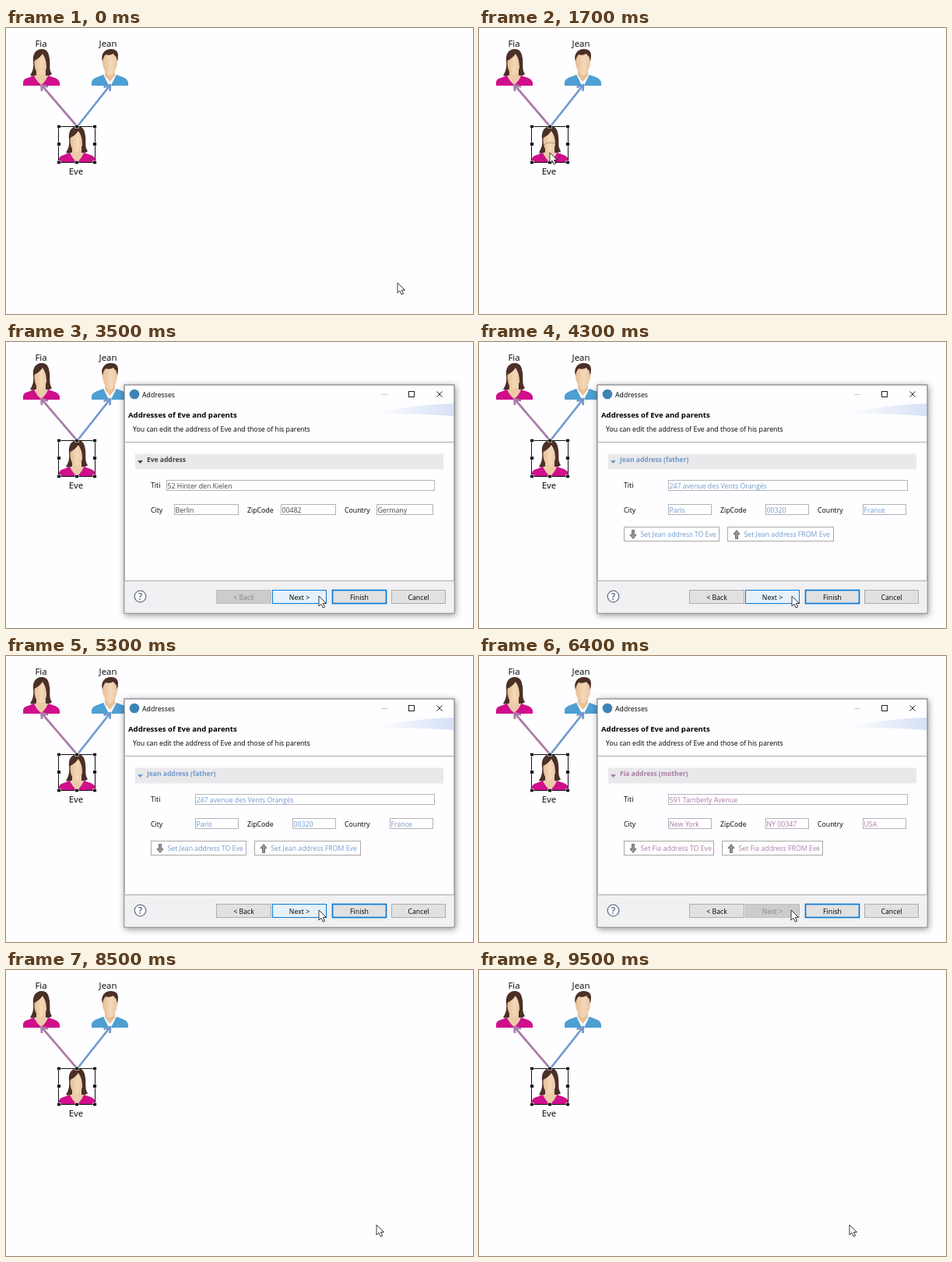
An HTML page for the animation above (9.6 s loop, 600x367 px).

```html
<!DOCTYPE html>
<html lang="en">
<head>
<meta charset="utf-8">
<title>Address wizard</title>
<style>
  html, body { margin: 0; width: 100%; height: 100%; overflow: hidden; background: #fefdff; }
  svg { display: block; width: 100%; height: 100%; }
  text { font: 8.75px "Open Sans", "Noto Sans", sans-serif; fill: #000; white-space: pre; }
  .name { font-size: 11.4px; text-anchor: middle; }
  .mid { text-anchor: middle; }
  .title { font-size: 9.6px; font-weight: 700; }
  .section { font-size: 8.5px; font-weight: 700; }
  .line { fill: none; stroke-width: 2.7; stroke-linejoin: round; }
</style>
</head>
<body>
<svg id="stage" viewBox="0 0 600 367">
  <defs>
    <linearGradient id="skin">
      <stop offset="0" stop-color="#e8bd94"/><stop offset=".55" stop-color="#f3d8ba"/><stop offset="1" stop-color="#ebc6a0"/>
    </linearGradient>
    <linearGradient id="banner">
      <stop offset="0" stop-color="#fff"/><stop offset="1" stop-color="#d6e1f6"/>
    </linearGradient>
    <filter id="shadow" x="-5%" y="-6%" width="110%" height="114%">
      <feDropShadow dx="1" dy="2" stdDeviation="4" flood-opacity=".42"/>
    </filter>
    <g id="woman">
      <path d="M24 0C15 0 12 8 13 16C14 24 12 29 9 34Q14 36 18 33L29 34Q34 35 37 32C33 27 35 21 34 13C33 5 31 0 24 0Z" fill="#4a3027"/>
      <path d="M17 27V34L12 37L23 47L35 37L29 34V25Z" fill="#edcba8"/>
      <path d="M14.5 15Q21 12 25 6Q30 13 31 18C31 25 27 33 22.500 33C17 32 14 25 14.500 15Z" fill="url(#skin)"/>
      <path d="M25 6Q30 13 30 23Q30 30 29 33Q34 35 36 32C32 26 35 18 33 10Z" fill="#4a3027"/>
      <path d="M0 47V42Q1 38 6 37L14 34Q17 41 23 46Q29 42 32 34L41 37Q46 39 47 43V47Z" fill="#d00f8b"/>
    </g>
    <g id="man">
      <path d="M17 25V34L14 36L23.500 47L33 36L30 34V25Z" fill="#e9c097"/>
      <path d="M14.500 10Q13 17 15 23Q18 33 23.500 34Q29 33 32 23Q34 16 32.500 10L28 5H17Z" fill="url(#skin)"/>
      <path d="M14 16Q12 9 15 5Q18 0 25 0Q33 0 34 7Q34 12 33 16L31.500 10Q29 8 28 6Q23 9 18 7Q15 10 14 16Z" fill="#4a3027"/>
      <path d="M0 47V42Q1 38 7 36L15 33L23.500 45L32 33L40 36Q46 38 47 43V47Z" fill="#4e9fd2"/>
      <path d="M16 33L23.500 42L31 33L32 36L27 47H20L15 36Z" fill="#fff"/>
      <path d="M14 34L20.500 47M33 34L26.500 47" stroke="#4e9fd2" stroke-width="3"/>
    </g>
  </defs>
  <g id="diagram"></g>
  <g id="dialog"></g>
  <circle id="ring" cx="91.5" cy="160" fill="none" stroke="#111"/>
  <path id="cursor" d="M0 0V13L3 10.2L5.3 15L7.6 14L5.4 9.4H9.4Z" fill="#fff" stroke="#222" stroke-width=".9"/>
</svg>
<script>
const LOOP = 9600;
const OPEN = 1900, CLOSE = 8300, FATHER_PAGE = 4000, MOTHER_PAGE = 6100;
const RING_START = 1700, RING_END = 2600;
const BLUE = '#7199cd', PURPLE = '#a97ca8';
const CHILD = 'Eve', FATHER = 'Jean', MOTHER = 'Fia';

const $ = id => document.getElementById(id);
const text = (x, y, s, cls = '', fill = '') =>
  `<text x="${x}" y="${y}" class="${cls}"${fill && ` style="fill:${fill}"`}>${s}</text>`;
const box = (x, y, w, h, fill, stroke = 'none', more = '') =>
  `<rect x="${x}" y="${y}" width="${w}" height="${h}" fill="${fill}" stroke="${stroke}" ${more}/>`;
const path = (d, stroke, more = '') => `<path d="${d}" fill="none" stroke="${stroke}" ${more}/>`;
const person = (kind, x, y) => `<use href="#${kind}" x="${x}" y="${y}"/>`;

function diagram() {
  let handles = '';
  for (const x of [68, 91, 114]) for (const y of [126.5, 149, 172.5])
    if (x !== 91 || y !== 149) handles += box(x - 2.2, y - 2.2, 4.4, 4.4, '#000', '#fff', 'stroke-width=".6"');
  return person('woman', 22, 27) + person('man', 110, 27) + person('woman', 68, 126) +
    path('M91 126L45.500 73M46 81L45.500 73L54 75.500', PURPLE, 'class="line"') +
    path('M92 126L134 73M125.500 76L134 73L133.500 81', BLUE, 'class="line"') +
    box(67.5, 126.5, 47, 46, 'none', '#111') + handles +
    text(45, 24, MOTHER, 'name') + text(131, 24, FATHER, 'name') + text(90, 188, CHILD, 'name');
}

const field = (x, right, y, value, color) =>
  box(x + .5, y + .5, right - x - 1, 13, '#fff', '#b4b4b8') + text(x + 1.5, y + 10.5, value, '', color);

function copyButton(x, right, label, color, up) {
  const turn = up ? `rotate(180 ${x + 12} 247)` : '';
  return box(x + .5, 237.5, right - x - 1, 18, '#fff', '#a8a8a8') +
    `<path transform="${turn}" d="M${x + 10.5} 241.5h3v6h2.5l-4 5l-4-5h2.5z" fill="#999" stroke="#555" stroke-width=".8"/>` +
    text(x + 21.5, 250, label, '', color);
}

function page(id, p) {
  const [titleX, cityX, zipX, countryX] = p.fields;
  const ink = p.color || '#444';
  return `<g id="${id}">` + box(166, 143.5, 396, 20, '#e9e8ea') +
    `<path d="M169 152h7l-3.5 4z" fill="${ink}"/>` +
    text(181, 154, p.heading, 'section', ink) +
    text(186, 187, 'Titi') + text(186, 219, 'City') + text(310, 219, 'ZipCode') + text(435, 219, 'Country') +
    field(titleX, 551, 177, p.street, ink) + field(cityX, 299, 208, p.city, ink) +
    field(zipX, 424, 208, p.zip, ink) + field(countryX, 549, 208, p.country, ink) +
    (p.who ? copyButton(186, p.split, `Set ${p.who} address TO ${CHILD}`, ink) +
      copyButton(p.split + 10, p.end, `Set ${p.who} address FROM ${CHILD}`, ink, true) : '') + '</g>';
}

const parentFields = [243, 243, 368, 493];
const pages = {
  child: { heading: `${CHILD} address`, fields: [206, 216, 353, 476],
    street: '52 Hinter den Kielen', city: 'Berlin', zip: '00482', country: 'Germany' },
  father: { heading: `${FATHER} address (father)`, who: FATHER, color: BLUE, fields: parentFields, split: 309, end: 456,
    street: '247 avenue des Vents Orangés', city: 'Paris', zip: '00320', country: 'France' },
  mother: { heading: `${MOTHER} address (mother)`, who: MOTHER, color: PURPLE, fields: parentFields, split: 302, end: 442,
    street: '591 Tamberly Avenue', city: 'New York', zip: 'NY 00347', country: 'USA' }
};

const button = (id, x, right, label) => `<g id="${id}">` +
  box(x + .5, 318.5, right - x - 1, 17, '#e1e1e1', '#adadad') +
  text((x + right) / 2, 331, label, 'mid') + '</g>';

function dialog() {
  return box(152, 55, 424, 293, '#fefdff', '#6c6c6c', 'filter="url(#shadow)"') +
    '<circle cx="165" cy="67" r="6.3" fill="#3d83b5"/>' + text(175, 71, 'Addresses') +
    path('M482 67.5h8', '#ccc') + box(517.5, 63.5, 7, 7, 'none', '#222') +
    path('M553.5 63.5l7 7m0-7l-7 7', '#222') +
    '<path d="M468 93Q515 81 575 79V95Q520 91 468 93Z" fill="url(#banner)"/>' +
    text(157, 96.5, `Addresses of ${CHILD} and parents`, 'title') +
    text(163, 115, `You can edit the address of ${CHILD} and those of his parents`) +
    path('M152.5 128.5H575.5', '#aaa') +
    Object.entries(pages).map(([id, p]) => page(id, p)).join('') +
    box(152.5, 306.5, 423, 41, '#f1f0f2') + path('M152.5 306.5H575.5', '#aaa') +
    '<circle cx="172.5" cy="326.5" r="7.3" fill="#fff" stroke="#66758f" stroke-width="1.3"/>' +
    '<text x="172.5" y="330.8" class="mid" style="font-size:12px;font-weight:600;fill:#55647f">?</text>' +
    button('back', 270, 341, '&lt; Back') + button('next', 342, 412, 'Next &gt;') +
    button('finish', 419, 489, 'Finish') + button('cancel', 495, 565, 'Cancel');
}

// Cursor stops: time, x, y
const stops = [
  [0, 503, 327], [200, 503, 327], [1100, 91, 160], [2600, 91, 160], [3500, 402, 326],
  [6100, 402, 326], [6700, 400, 326], [7400, 400, 326], [8000, 476, 327], [LOOP, 476, 327]
];

function cursorAt(t) {
  const i = stops.findIndex(s => s[0] > t);
  const [t0, x0, y0] = stops[i - 1], [t1, x1, y1] = stops[i];
  const u = (t - t0) / (t1 - t0), e = u * u * (3 - 2 * u);
  return [x0 + (x1 - x0) * e, y0 + (y1 - y0) * e];
}

const show = (id, on) => $(id).setAttribute('visibility', on ? 'inherit' : 'hidden');

function style(id, state) {
  const [fill, stroke, width, ink] = {
    normal: ['#e1e1e1', '#adadad', 1, '#000'],
    primary: ['#e1e1e1', '#0b79d4', 1.7, '#000'],
    hover: ['#e5f1fb', '#0b79d4', 1, '#000'],
    disabled: ['#cccccc', '#bfbfbf', 1, '#858585']
  }[state];
  const [rect, label] = $(id).children;
  rect.setAttribute('fill', fill);
  rect.setAttribute('stroke', stroke);
  rect.setAttribute('stroke-width', width);
  label.style.fill = ink;
}

function render(t) {
  const [x, y] = cursorAt(t);
  $('cursor').setAttribute('transform', `translate(${x} ${y})`);

  const ringAge = t - RING_START;
  show('ring', ringAge >= 0 && t < RING_END);
  $('ring').setAttribute('r', Math.max(0, 13 + ringAge * .036));
  $('ring').setAttribute('opacity', Math.min(1, Math.max(0, .3 + ringAge / 300)));

  const current = t < FATHER_PAGE ? 'child' : t < MOTHER_PAGE ? 'father' : 'mother';
  $('dialog').setAttribute('visibility', t >= OPEN && t < CLOSE ? 'visible' : 'hidden');
  for (const id in pages) show(id, id === current);

  const over = (left, right) => x >= left && x <= right && y >= 318 && y <= 336;
  style('back', current === 'child' ? 'disabled' : 'normal');
  style('next', current === 'mother' ? 'disabled' : over(342, 412) ? 'hover' : 'normal');
  style('finish', over(419, 489) ? 'hover' : 'primary');
}

$('diagram').innerHTML = diagram();
$('dialog').innerHTML = dialog();

const start = performance.now();
function tick() {
  const t = (performance.now() - start) % LOOP;
  render(Math.floor(t / 100) * 100);
  requestAnimationFrame(tick);
}
tick();
</script>
</body>
</html>
```
